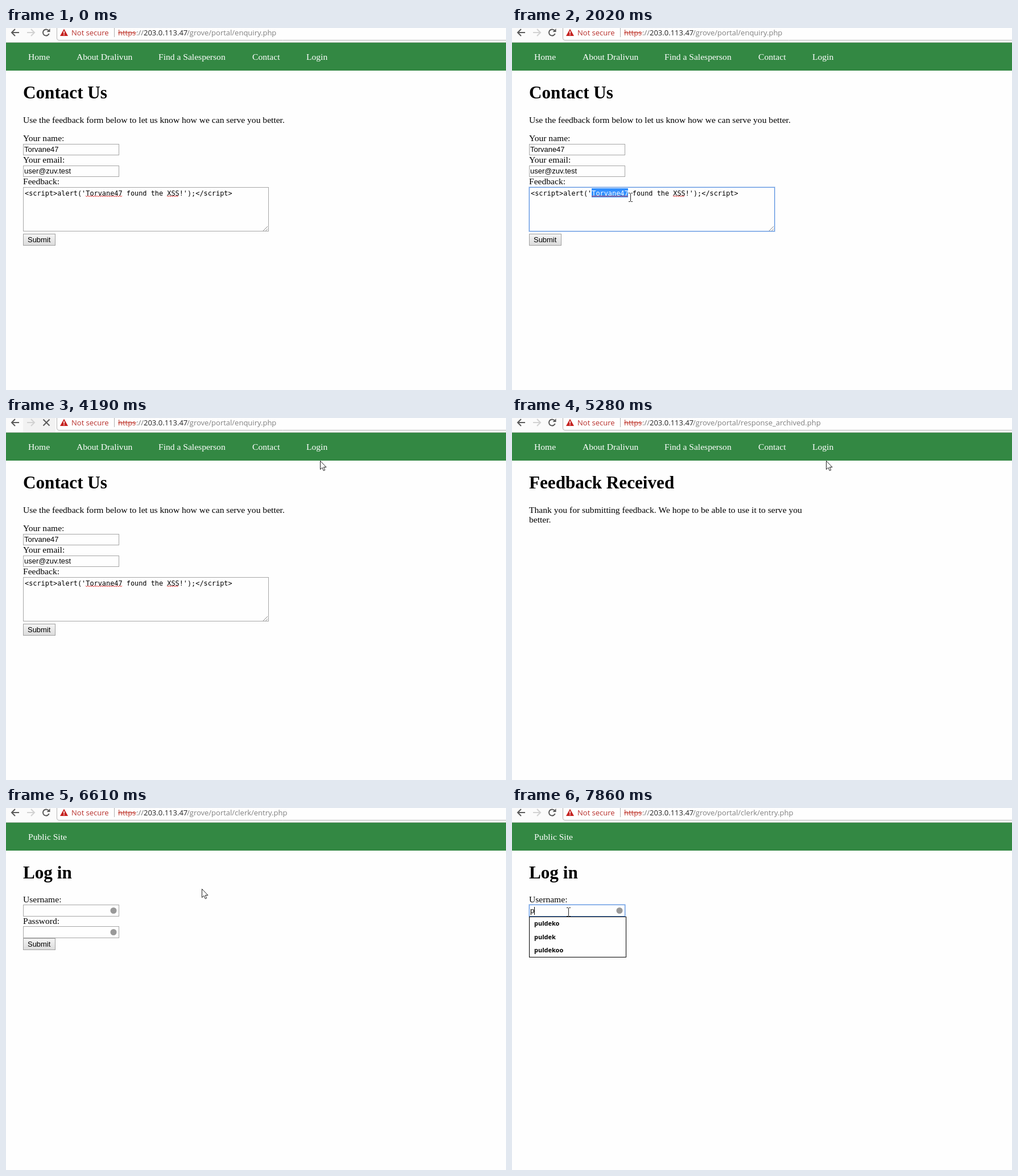
Write an HTML page with a canvas that moves like this. It is 879 px wide and 637 px high and loops after 7.99 s.

```html
<!DOCTYPE html>
<html lang="en">
<head>
<meta charset="utf-8">
<title>Feedback form</title>
<style>
html, body { margin: 0; width: 100%; height: 100%; overflow: hidden; background: #fefefe; }
canvas { display: block; }
</style>
</head>
<body>
<canvas id="stage" width="879" height="637"></canvas>
<script>
const ctx = document.getElementById('stage').getContext('2d');
const LOOP = 7990;
const SERIF = '15.58px "Liberation Serif", serif';
const HEADING = 'bold 31.16px "Liberation Serif", serif';
const SANS = '12.96px "Liberation Sans", sans-serif';
const MONO = '11.88px "DejaVu Sans Mono", monospace';
const UI = '13px "Open Sans", sans-serif';
const LIST = 'bold 11px "Open Sans", sans-serif';
const CHAR = 7.15;
const NAME = 'Torvane47';
const HOST = '203.0.113.47';
const USERS = ['puldeko', 'puldek', 'puldekoo'];
const OTHERS = ['admin', 'tester', 'guest'];
const PAGE = '#fefefe';
const FOCUS = '#5b92e0';

// time, shape, hot spot
const CURSOR = [
  [460, 'arrow', 142, 363], [590, 'beam', 147, 342], [710, 'beam', 144, 325],
  [830, 'beam', 141, 310], [970, 'beam', 149, 303], [1090, 'beam', 141, 298],
  [1360, 'beam', 156, 298], [1490, 'beam', 173, 298], [1630, 'beam', 182, 298],
  [1750, 'beam', 193, 298], [1870, 'beam', 204, 298], [2020, 'beam', 208, 298],
  [2300, 'arrow', 134, 388], [2450, 'arrow', 130, 402], [2580, 'arrow', 123, 413],
  [2730, 'arrow', 92, 402], [2860, 'arrow', 68, 390], [3010, 'arrow', 68, 386],
  [3130, 'arrow', 70, 380], [3250, 'arrow', 71, 376], [3520, 'arrow', 71, 374],
  [3670, 'arrow', 482, 123], [3920, 'arrow', 495, 114], [4070, 'arrow', 535, 90],
  [4190, 'arrow', 552, 75], [5430, 'arrow', 482, 145], [5550, 'arrow', 530, 91],
  [5680, 'hand', 554, 45], [5820, 'hand', 567, 31], [5950, 'hand', 564, 28],
  [6100, 'hand', 565, 35], [6220, 'hand', 554, 49], [6490, 'arrow', 450, 96],
  [6610, 'arrow', 344, 142], [6760, 'arrow', 192, 176], [6890, 'arrow', 89, 193],
  [7170, 'beam', 95, 186], [7310, 'beam', 99, 183]
];
const SELECTED = [[1360, 2], [1490, 4], [1630, 5], [1750, 7], [1870, 8], [2020, 9], [2580, 0]];

const latest = (list, t) => list.filter(step => step[0] <= t).pop();

function text(str, x, y, font, color = '#000') {
  ctx.font = font;
  ctx.fillStyle = color;
  ctx.fillText(str, x, y);
}

function box(x, y, w, h, fill) {
  ctx.fillStyle = fill;
  ctx.fillRect(x, y, w, h);
}

function frame(x, y, w, h, color) {
  ctx.strokeStyle = color;
  ctx.lineWidth = 1;
  ctx.strokeRect(x + .5, y + .5, w - 1, h - 1);
}

function line(color, width, ...points) {
  ctx.strokeStyle = color;
  ctx.lineWidth = width;
  ctx.beginPath();
  points.forEach(([x, y]) => ctx.lineTo(x, y));
  ctx.stroke();
}

function polygon(points, fill, stroke) {
  ctx.beginPath();
  points.forEach(([x, y]) => ctx.lineTo(x, y));
  ctx.closePath();
  ctx.fillStyle = fill;
  ctx.fill();
  if (stroke) {
    ctx.strokeStyle = stroke;
    ctx.lineWidth = 1;
    ctx.stroke();
  }
}

function navArrow(x, dir, color) {
  line(color, 2, [x - 7 * dir, 8], [x + 6 * dir, 8]);
  line(color, 2, [x, 2], [x + 6 * dir, 8], [x, 14]);
}

function toolbar(path, loading) {
  box(0, 0, 879, 25, '#fbfbfb');
  box(0, 25, 879, 1, '#a9b8ab');
  if (loading) box(30, 0, 57, 25, '#f2f2f2');
  navArrow(16, -1, '#5a5a5a');
  navArrow(44, 1, '#d2d2d2');
  if (loading) {
    line('#5a5a5a', 2, [65.5, 2.5], [76.5, 13.5]);
    line('#5a5a5a', 2, [76.5, 2.5], [65.5, 13.5]);
  } else {
    ctx.strokeStyle = '#5a5a5a';
    ctx.lineWidth = 2;
    ctx.beginPath();
    ctx.arc(70.5, 8, 5.5, .35, 5.5);
    ctx.stroke();
    polygon([[77.5, 1], [77.5, 7], [71.5, 7]], '#5a5a5a');
  }
  ctx.beginPath();
  ctx.moveTo(89.5, -2);
  ctx.lineTo(89.5, 18);
  ctx.quadraticCurveTo(89.5, 21.5, 93, 21.5);
  ctx.lineTo(881, 21.5);
  ctx.lineTo(881, -2);
  ctx.fillStyle = PAGE;
  ctx.fill();
  ctx.strokeStyle = '#b4b4b4';
  ctx.lineWidth = 1;
  ctx.stroke();

  polygon([[102, 1.5], [109, 14], [95, 14]], '#c5221f');
  box(101.2, 5.5, 1.6, 4.5, '#fff');
  box(101.2, 11, 1.6, 1.6, '#fff');
  text('Not secure', 115, 13, UI, '#b8302c');
  box(190, 0, 1, 16, '#b0b0b0');
  text('https', 197, 13, UI, '#c0392f');
  line('#c0392f', 1, [197, 8.5], [229, 8.5]);
  text('://', 229, 13, UI, '#777');
  text(HOST, 242, 13, UI, '#222');
  text('/grove/portal/' + path, 318, 13, UI, '#808080');
}

function header(links, title) {
  box(0, 26, 879, 49, '#338843');
  links.forEach(([label, x]) => text(label, x, 56, SERIF, '#fff'));
  text(title, 30, 124, HEADING);
}

const MENU = [['Home', 39], ['About Dralivun', 124], ['Find a Salesperson', 268],
  ['Contact', 433], ['Login', 528]];

function field(x, y, w, h, focused) {
  box(x, y, w, h, PAGE);
  frame(x, y, w, h, focused ? FOCUS : '#a6a6a6');
  if (focused) {
    ctx.globalAlpha = .35;
    frame(x - 1, y - 1, w + 2, h + 2, FOCUS);
    ctx.globalAlpha = 1;
  }
}

function button(y, state) {
  const shade = ctx.createLinearGradient(0, y, 0, y + 20);
  const tones = { hover: ['#fafafa', '#e6e6e6'], down: ['#d8d8d8', '#ececec'] }[state] || ['#f5f5f5', '#dcdcdc'];
  shade.addColorStop(0, tones[0]);
  shade.addColorStop(1, tones[1]);
  box(30, y, 57, 21, shade);
  frame(30, y, 57, 21, state ? '#858585' : '#a0a0a0');
  text('Submit', 38, y + 15, SANS);
}

function squiggle(x, w) {
  const points = [];
  for (let i = 0; i <= w; i += 2) points.push([x + i, i % 4 ? 297 : 295]);
  line('#e23b3b', 1, ...points);
}

function feedbackForm(t) {
  text('Use the feedback form below to let us know how we can serve you better.', 30, 167, SERIF);
  text('Your name:', 30, 199, SERIF);
  field(30, 204, 169, 20);
  text(NAME, 32, 218, SANS);
  text('Your email:', 30, 237, SERIF);
  field(30, 242, 169, 20);
  text('user@zuv.test', 32, 256, SANS);
  text('Feedback:', 30, 275, SERIF);

  const focused = t >= 1240 && t < 2580;
  const selected = (latest(SELECTED, t) || [0, 0])[1];
  const start = 33 + 15 * CHAR;
  field(30, 280, 432, 78, focused);
  line('#888', 1, [452, 357], [460, 349]);
  line('#888', 1, [456.5, 357], [460, 353.5]);
  text(`<script>alert('${NAME} found the XSS!');<\/script>`, 33, 295, MONO);
  if (selected) {
    box(Math.round(start), 282, Math.round(selected * CHAR), 16, '#3390ff');
    text(NAME.slice(0, selected), start, 295, MONO, '#fff');
  } else if (focused) {
    box(140, 283, 1, 14, '#000');
  }
  squiggle(140, 64);
  squiggle(283, 21);
  const state = t >= 3130 && t < 3670 ? (t >= 3370 && t < 3520 ? 'down' : 'hover') : '';
  button(362, state);
}

function credential(label, y, focused) {
  text(label, 30, y - 4, SERIF);
  field(30, y, 169, 21, focused);
  ctx.fillStyle = '#999';
  ctx.beginPath();
  ctx.arc(189, y + 10.5, 5.5, 0, 7);
  ctx.fill();
}

function loginForm(t) {
  const focused = t >= 7310, typed = t >= 7860;
  credential('Username:', 170, focused);
  credential('Password:', 208);
  button(229);
  if (typed) text('p', 32, 185, SANS);
  if (focused) box(typed ? 39 : 32, 174, 1, 14, '#000');
  if (t >= 7430) {
    const names = typed ? USERS : USERS.concat(OTHERS);
    const height = Math.round(names.length * 23.5 + 1);
    box(30, 191, 171, height, PAGE);
    frame(30, 191, 171, height, '#000');
    names.forEach((name, i) => text(name, 39, 207 + i * 23.5, LIST));
  }
}

const SHAPES = {
  arrow() {
    polygon([[.5, .5], [.5, 15.5], [4, 12.3], [6.3, 17.7], [8.7, 16.7],
      [6.4, 11.5], [11, 11.5]], '#fff', '#222');
  },
  beam() {
    line('#222', 1, [-3, -7.5], [-.5, -7.5], [.5, -6.5], [1.5, -7.5], [4, -7.5]);
    line('#222', 1, [.5, -7], [.5, 7]);
    line('#222', 1, [-3, 7.5], [-.5, 7.5], [.5, 6.5], [1.5, 7.5], [4, 7.5]);
  },
  hand() {
    polygon([[-.5, .5], [1.5, .5], [1.5, 6], [10.5, 8], [11.5, 13], [9.5, 18.5],
      [1, 18.5], [-4.5, 11.5], [-3, 10], [-.5, 12]], '#fff', '#222');
    line('#222', 1, [4.5, 7], [4.5, 10]);
    line('#222', 1, [7.5, 7.5], [7.5, 10]);
  }
};

function cursor(t) {
  const step = latest(CURSOR, t);
  if (!step) return;
  const [, shape, x, y] = step;
  ctx.save();
  ctx.translate(x, y);
  SHAPES[shape]();
  ctx.restore();
}

function draw(t) {
  box(0, 0, 879, 637, PAGE);
  if (t < 5280) {
    toolbar('enquiry.php', t >= 3520);
    header(MENU, 'Contact Us');
    feedbackForm(t);
  } else if (t < 6370) {
    toolbar('response_archived.php');
    header(MENU, 'Feedback Received');
    text('Thank you for submitting feedback. We hope to be able to use it to serve you', 30, 167, SERIF);
    text('better.', 30, 184, SERIF);
  } else {
    toolbar('clerk/entry.php');
    header([['Public Site', 39]], 'Log in');
    loginForm(t);
  }
  cursor(t);
}

let begin;
function tick(now) {
  begin ??= now;
  draw((now - begin) % LOOP);
  requestAnimationFrame(tick);
}
requestAnimationFrame(tick);
</script>
</body>
</html>
```
